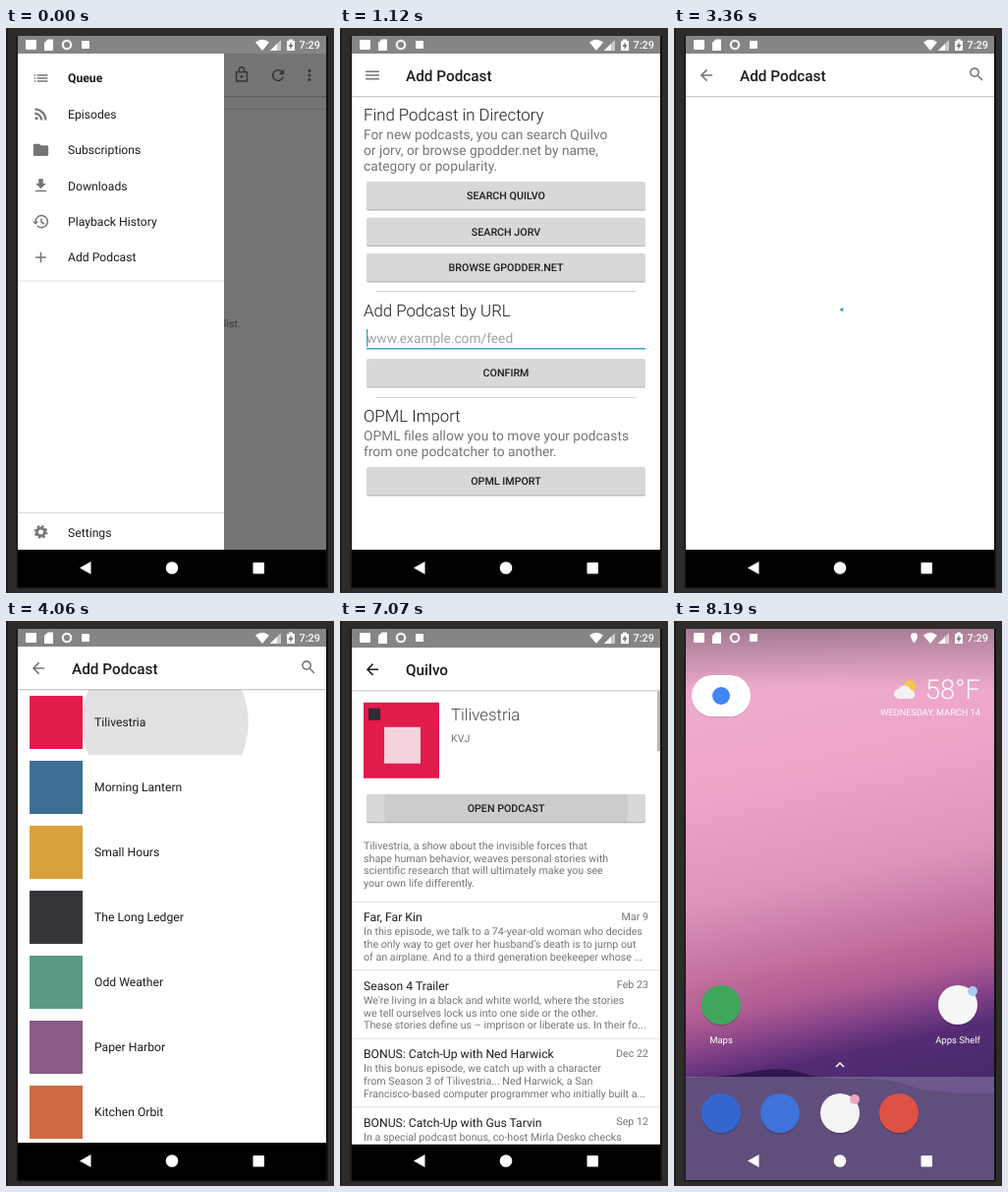
An HTML page for the animation above (8.26 s loop, 334 by 574 pixels).

```html
<!DOCTYPE html>
<html lang="en">
<head>
<meta charset="utf-8">
<title>Adding a podcast</title>
<style>
html, body { margin: 0; width: 100%; height: 100%; overflow: hidden; background: #2b2a28; }
svg { display: block; }
text { font-family: Roboto, "Noto Sans", sans-serif; text-rendering: geometricPrecision; white-space: pre; }
</style>
</head>
<body>
<svg id="stage" width="334" height="574" viewBox="0 0 334 574"></svg>
<script>
const LOOP = 8260, STEP = 70;
const GRAY = '#757575', INK = '#1c1c1c', TEAL = '#35a4c6', RED = '#e21b4d';
const SHOW = 'Tilivestria', MAKER = 'KVJ', STORE = 'Quilvo';

const rect = (x, y, w, h, fill, extra = '') =>
  `<rect x="${x}" y="${y}" width="${w}" height="${h}" fill="${fill}" ${extra}/>`;
const circle = (x, y, r, fill, extra = '') =>
  `<circle cx="${x}" cy="${y}" r="${r}" fill="${fill}" ${extra}/>`;
const text = (x, y, str, size, fill = INK, weight = 400, anchor = 'start', extra = '') =>
  `<text x="${x}" y="${y}" font-size="${size}" fill="${fill}" font-weight="${weight}" text-anchor="${anchor}" ${extra}>${str}</text>`;
const lines = (x, y, pitch, rows, size, fill) =>
  rows.map((row, i) => text(x, y + i * pitch, row, size, fill)).join('');
const group = (id, body) => `<g id="${id}">${body}</g>`;
const clip = (x, y, w, h, body) =>
  `<svg x="${x}" y="${y}" width="${w}" height="${h}" viewBox="0 0 ${w} ${h}">${body}</svg>`;
const hidden = id => `id="${id}" opacity="0"`;
const stroke = (d, w = 2) => `<path d="${d}" fill="none" stroke="currentColor" stroke-width="${w}"/>`;
const solid = d => `<path d="${d}" fill="currentColor"/>`;
const gear = (x, y, r) =>
  circle(x, y, r, 'none', `stroke="currentColor" stroke-width="${r * .72}"`) +
  circle(x, y, r * 1.5, 'none', `stroke="currentColor" stroke-width="${r * .5}" stroke-dasharray="${r * .64} ${r * .538}"`);

// Glyphs on a 24-unit grid
const GLYPHS = {
  menu: stroke('M3 7H21M3 12H21M3 17H21'),
  back: stroke('M20 12H5M12.7 4.7 5.4 12l7.3 7.3'),
  search: stroke('M9.5 4a5.5 5.5 0 1 0 .01 0M14 14l5.8 5.8'),
  refresh: stroke('M18.8 14a7 7 0 1 1-1.6-6.7') + solid('M20 4v7h-7z'),
  more: [6, 12, 18].map(y => circle(12, y, 2, 'currentColor')).join(''),
  list: stroke('M3 8h2m2 0h14M3 12h2m2 0h14M3 16h2m2 0h14'),
  rss: stroke('M4 5.6A14.4 14.4 0 0 1 18.4 20M4 11.3A8.7 8.7 0 0 1 12.7 20', 2.8) + circle(6.2, 17.8, 2.2, 'currentColor'),
  folder: solid('M4 4h6l2 2h8q2 0 2 2v10q0 2-2 2H4q-2 0-2-2V6q0-2 2-2z'),
  download: solid('M19 9h-4V3H9v6H5l7 7zM5 18v2h14v-2z'),
  history: stroke('M5 12a8 8 0 1 1 2.4 5.7M12.7 8v5l4 2.3') + solid('M1 12h8l-4 4z'),
  add: stroke('M12 5v14M5 12h14'),
  settings: gear(12, 12, 5.1),
  gears: gear(8, 12, 4.1) + gear(18.5, 6.5, 2.4) + gear(18.5, 17.5, 2.4),
  filter: stroke('M3 7h18M6 12h12M10 17h4'),
  lock: stroke('M5 9h14v12H5zM8.5 9V6a3.5 3.5 0 0 1 7 0v3') + circle(12, 15, 2, 'currentColor'),
  hearing: stroke('M7 3a9 9 0 0 0 0 13M4 1a13 13 0 0 0 0 17M10 9a4.5 4.5 0 0 1 9 0c0 4-4 4.5-5 8s-4 4-5.5 2.5', 1.9) + circle(14.5, 9, 2, 'currentColor'),
  info: circle(12, 12, 10, 'currentColor') + '<path d="M12 7v2M12 11v6" stroke="#8c1733" stroke-width="2"/>'
};
const icon = (name, x, y, color = GRAY, size = 18.4) =>
  `<g color="${color}" transform="translate(${x - size / 2} ${y - size / 2}) scale(${size / 24})">${GLYPHS[name]}</g>`;

const toolbar = (left, title, leftColor = GRAY) =>
  rect(12, 69, 314, 1, '#c9c9c9') + rect(12, 70, 314, 1, '#ececec') +
  icon(left, 33, 48, leftColor) + text(67, 53.7, title, 15.3, INK, 500);
const page = rect(12, 8, 314, 18, '#858585') + rect(12, 26, 314, 542, '#fff');
const button = (y, label, id = '') =>
  rect(27, y + 1, 284, 28.5, '#b5b5b5', `rx="2" id="${id}Shadow"`) +
  clip(27, y, 284, 28.5, rect(0, 0, 284, 28.5, '#d8d8d8', 'rx="2"') + (id && circle(142, 14, 0, '#000', hidden(id + 'Ripple')))) +
  text(169, y + 18, label, 10.7, INK, 500, 'middle', id && `id="${id}Label"`);
const spinner = id => circle(169.5, 300, 14, 'none',
  `id="${id}" stroke="${TEAL}" stroke-width="3" pathLength="100"`);
const cover = y => rect(24, y, 77, 77, RED) + rect(45, y + 25, 37, 37, '#f4d3dc') + rect(29, y + 6, 12, 12, '#2c2c34');

const DRAWER = [['list', 'Queue'], ['rss', 'Episodes'], ['folder', 'Subscriptions'],
  ['download', 'Downloads'], ['history', 'Playback History'], ['add', 'Add Podcast']];
const EPISODES = [
  ['Far, Far Kin', 'Mar 9', 'In this episode, we talk to a 74-year-old woman who decides',
    'the only way to get over her husband’s death is to jump out', 'of an airplane. And to a third generation beekeeper whose ...'],
  ['Season 4 Trailer', 'Feb 23', "We're living in a black and white world, where the stories",
    'we tell ourselves lock us into one side or the other.', 'These stories define us – imprison or liberate us. In their fo...'],
  ['BONUS: Catch-Up with Ned Harwick', 'Dec 22', 'In this bonus episode, we catch up with a character',
    `from Season 3 of ${SHOW}... Ned Harwick, a San`, 'Francisco-based computer programmer who initially built a...'],
  ['BONUS: Catch-Up with Gus Tarvin', 'Sep 12', 'In a special podcast bonus, co-host Mirla Desko checks'],
  ['Season 3 Extra', 'Sep 5']
];

const queuePage = page + toolbar('menu', 'Queue') + icon('lock', 240, 47) + icon('refresh', 277, 48) +
  icon('more', 309, 48) + rect(12, 82, 314, 1, '#ddd') +
  text(169, 304, 'There are no items in this list.', 10.7, GRAY, 400, 'middle');

const addPage = page + toolbar('menu', 'Add Podcast') +
  text(24, 93.5, 'Find Podcast in Directory', 16.8, INK, 300) +
  lines(24, 112.5, 16, [`For new podcasts, you can search ${STORE}`, 'or jorv, or browse gpodder.net by name,', 'category or popularity.'], 13.75, GRAY) +
  button(156, `SEARCH ${STORE.toUpperCase()}`, 'search') + button(192.5, 'SEARCH JORV') + button(229, 'BROWSE GPODDER.NET') +
  rect(37, 267, 264, 1, '#d2d2d2') + text(24, 293, 'Add Podcast by URL', 16.8, INK, 300) +
  text(27, 319.5, 'www.example.com/feed', 13.75, '#a2a2a2') + rect(27, 306, 1.3, 18, TEAL) + rect(27, 325, 284, 1.5, TEAL) +
  button(336, 'CONFIRM') + rect(37, 375, 264, 1, '#d2d2d2') + text(24, 399.5, 'OPML Import', 16.8, INK, 300) +
  lines(24, 419, 16, ['OPML files allow you to move your podcasts', 'from one podcatcher to another.'], 13.75, GRAY) +
  button(446, 'OPML IMPORT');

const RESULTS = [[SHOW, RED], ['Morning Lantern', '#3d6f92'], ['Small Hours', '#d8a13c'], ['The Long Ledger', '#35353c'],
  ['Odd Weather', '#5a9a86'], ['Paper Harbor', '#8b5a86'], ['Kitchen Orbit', '#cf6a44']];
const resultRows = clip(12, 70, 314, 66, circle(150, 33, 0, '#000', hidden('resultRipple'))) +
  RESULTS.map(([name, color], i) => rect(24, 76 + i * 66, 54, 54, color) + text(90, 107 + i * 66, name, 12.2)).join('');
const searchPage = page + toolbar('back', 'Add Podcast') + icon('search', 308, 47) +
  spinner('searchSpin') + group('results', resultRows);

const detailRows = EPISODES.slice(0, 4).map(([title, date, ...body], i) => {
  const y = 283.5 + i * 69.5;
  return rect(12, y, 314, 1, '#dedede') + text(24, y + 20.5, title, 12.2) +
    text(314, y + 19, date, 10.7, GRAY, 400, 'end') + lines(24, y + 34.5, 12.8, body, 10.7, GRAY);
}).join('');
const detailBody = cover(81.5) + text(113, 99.5, SHOW, 16.8, '#444', 300) + text(113, 122, MAKER, 10.7, GRAY) +
  button(174.5, 'SUBSCRIBE', 'subscribe') +
  lines(24, 230.5, 12.8, [`${SHOW}, a show about the invisible forces that`, 'shape human behavior, weaves personal stories with',
    'scientific research that will ultimately make you see', 'your own life differently.'], 10.7, GRAY) +
  detailRows + rect(323, 70, 3, 61, '#b9b9b9');
const detailPage = clip(0, 0, 334, 530.5,
  page + toolbar('back', STORE, INK) + spinner('detailSpin') + group('detailBody', detailBody));

const loadingDots = (x, y) => circle(x, y, 4.3, 'none', 'stroke="#666" stroke-width="2" stroke-dasharray="1.7 1.677"');
const feedRows = EPISODES.map(([title, date], i) => {
  const y = 170 + i * 75;
  return text(24, y + 27, title, 12.2) + loadingDots(29, y + 53) + text(240, y + 59, date, 10.7, GRAY, 400, 'end') +
    icon('hearing', 253, y + 55, '#666', 16) + rect(288.5, y + 13, 1, 50, '#d5d5d5') +
    icon('download', 308, y + 38) + rect(12, y + 75, 314, 1, '#e0e0e0');
}).join('');
const softBars = [...Array(6)].map((_, i) =>
  rect(98 + i * 38, i % 2 ? 30 : 4, 16, 66, '#988087', `transform="rotate(${i % 3 * 14 - 14} ${106 + i * 38} 50)"`)).join('');
const feedPage = page + icon('menu', 33, 48) + icon('search', 166, 48) +
  icon('filter', 203, 48) + icon('gears', 240, 48, '#666', 20) + icon('refresh', 277, 48) + icon('more', 309, 48) +
  clip(12, 69.5, 314, 101, rect(0, 0, 314, 101, '#86122d') + `<g filter="url(#blur)">${softBars}</g>`) +
  cover(81) + text(113, 99.5, SHOW, 16.8, '#fff', 300) + text(113, 128, MAKER, 10.7, '#fff') +
  icon('info', 308, 94, '#fff', 19) + feedRows + text(282, 193.5, 'NEW', 9, '#8aa822', 400, 'end');

const drawer = rect(12, 26, 210, 504, '#fff') +
  DRAWER.map(([glyph, label], i) => {
    const y = 51 + i * 36.4;
    return icon(glyph, 35.5, y) + text(63, y + 4.3, label, 12.2, INK, 400, 'start', 'class="entry"');
  }).join('') +
  clip(12, 215, 210, 37, circle(105, 18, 0, '#000', hidden('drawerRipple'))) +
  rect(12, 256.5, 210, 1, '#dcdcdc') + rect(12, 492, 210, 1, '#dcdcdc') +
  icon('settings', 35.5, 512) + text(63, 516.5, 'Settings', 12.2);

const launcher = (x, y, color) => circle(x, y + 1.5, 20, '#000', 'opacity=".18"') + circle(x, y, 20, color);
const home = rect(12, 8, 314, 560, 'url(#sky)') + rect(12, 8, 314, 60, 'url(#topShade)') +
  '<path d="M12 464Q50 464 80 458T130 459T185 465T240 472T327 480V569H12z" fill="#2e184c"/>' +
  rect(12, 463, 314, 105, '#9d90b8', 'opacity=".45"') +
  rect(18, 56, 60, 42, '#000', 'rx="21" opacity=".12"') + rect(18, 55, 60, 42, '#fff', 'rx="21"') + circle(48, 76, 9, '#4285f4') +
  circle(240, 66, 6, '#f7c748') +
  '<path d="M229 79a5 5 0 0 1 0-10a6.5 6.5 0 0 1 12 1a4.6 4.6 0 0 1 1 9z" fill="#f2f1f4"/>' +
  text(312, 79, '58°F', 27.5, '#fff', 300, 'end') + text(312, 96, 'WEDNESDAY, MARCH 14', 9.2, '#fff', 400, 'end') +
  launcher(48, 390, '#3fa65b') + launcher(289, 390, '#f7f7f7') + circle(304, 376, 5, '#a9cdf3') +
  text(48, 429, 'Maps', 9.5, '#fff', 400, 'middle') + text(289, 429, 'Apps Shelf', 9.5, '#fff', 400, 'middle') +
  '<path d="M165 453l4-4 4 4" fill="none" stroke="#fff" stroke-width="1.5"/>' +
  launcher(48, 500, '#3566cf') + launcher(108, 500, '#3f72da') + launcher(169, 500, '#f5f3f4') +
  circle(184, 486, 5, '#eda9c2') + launcher(229, 500, '#dd5144');

const statusIcons = `<g fill="#fff">
  ${rect(20, 12, 11, 10, '#fff', 'rx="1"')}
  <path d="M42.5 11.5H48V23h-9v-8z"/>
  ${circle(62, 17, 4.2, 'none', 'stroke="#fff" stroke-width="2.2" opacity=".9"')}
  ${rect(77, 13, 8, 8, '#fff')}
  <path d="M254 14.5q7-5.5 14 0L261 23z"/>
  <path d="M280 12v11h-11z" opacity=".55"/><path d="M276 16v7h-7z"/>
  <path d="M286 13h2v-1.5h4V13h2v10h-8z"/><path d="M290.5 14l-3 5h2v3l3-5h-2z" fill="#777"/>
  <path id="pin" d="M244.5 12a3.5 3.5 0 0 1 3.5 3.5c0 2.5-3.5 7-3.5 7s-3.5-4.5-3.5-7a3.5 3.5 0 0 1 3.5-3.5z"/>
  </g>` + text(320, 21, '7:29', 10.9, '#fff', 500, 'end');
const navIcons = '<path d="M86.5 542v13L75 548.5z" fill="#fff"/>' + circle(169, 548.5, 6.3, '#fff') +
  rect(251.5, 543, 11.5, 11.5, '#fff', 'rx="1"');
const bezel = '<path fill-rule="evenodd" fill="#2d2c2a" d="M0 0H334V574H0zM12 8V568H326V8z"/>' +
  rect(0, 0, 2, 574, '#1d1c1b') + rect(10.5, 8, 1.5, 561, '#1a1918') + rect(326, 8, 2, 561, '#111') + rect(12, 568, 314, 1.5, '#151515');

const stops = pairs => pairs.map(([at, c, o = 1]) => `<stop offset="${at}" stop-color="${c}" stop-opacity="${o}"/>`).join('');
const stage = document.getElementById('stage');
stage.innerHTML = `<defs>
  <linearGradient id="sky" x2=".12" y2="1">${stops([[0, '#dda3c0'], [.14, '#eeabca'], [.32, '#eda3c7'], [.5, '#dc94bb'],
    [.62, '#c5739f'], [.71, '#ae5a92'], [.77, '#803f86'], [.82, '#552c74'], [1, '#3a2862']])}</linearGradient>
  <linearGradient id="topShade" x2="0" y2="1">${stops([[0, '#5c4a58', .45], [1, '#5c4a58', 0]])}</linearGradient>
  <filter id="blur"><feGaussianBlur stdDeviation="3"/></filter></defs>` +
  home +
  group('app', group('queue', queuePage) + group('add', addPage) + group('search', searchPage) + group('feed', feedPage) +
    rect(12, 26, 314, 504, '#000', 'id="scrim"') + group('drawer', drawer)) +
  rect(12, 530, 314, 38, '#000', 'id="navBar"') + group('detail', detailPage) +
  circle(169, 548.5, 0, '#fff', hidden('homeRipple')) + statusIcons + navIcons + bezel;

const el = id => document.getElementById(id);
const set = (id, name, value) => el(id).setAttribute(name, value);
const show = (id, on) => set(id, 'display', on ? 'inline' : 'none');
const span = (t, a, b) => Math.min(1, Math.max(0, (t - a) / (b - a)));
const ease = p => p * p * (3 - 2 * p);
const easeOut = (p, power) => 1 - (1 - p) ** power;

function ripple(id, t, start, end, reach = 145) {
  const p = span(t, start, end);
  set(id, 'r', reach * (.1 + .9 * easeOut(p, 2)));
  set(id, 'opacity', t < start ? 0 : .14 * (1 - p));
}

function spin(id, t, start) {
  const age = Math.max(0, t - start), u = age % 1333 / 1333;
  const tail = 75 * ease(span(u, .5, 1)), head = 75 * ease(span(u, 0, .5)) + 3;
  const turns = Math.floor(age / 1333) * .75;
  set(id, 'stroke-dasharray', `${head - tail} 100`);
  set(id, 'stroke-dashoffset', -tail);
  set(id, 'transform', `rotate(${-95 + 360 * turns + age * .162} 169.5 300)`);
}

// Opening rises into place while fading in; closing sinks while fading out.
function moveDetail(t) {
  const closing = span(t, 7042, 7210);
  const y = 45 * (1 - easeOut(span(t, 4100, 4410), 5)) + 45 * closing ** 2;
  set('detail', 'transform', `translate(0 ${y})`);
  set('detail', 'opacity', easeOut(span(t, 4100, 4300), 4) * (1 - span(closing, .4, 1)));
  show('detail', t >= 4100 && closing < 1);
}

function render(t) {
  show('queue', t < 630);
  show('add', t >= 630 && t < 3290);
  show('search', t >= 3290 && t < 4410);
  show('feed', t >= 7000);

  const closed = easeOut(span(t, 600, 1112), 5);
  set('drawer', 'transform', `translate(${-212 * closed} 0)`);
  show('drawer', closed < 1);
  set('scrim', 'opacity', .54 * (1 - closed));
  const chosen = t < 630 ? 0 : 5;
  document.querySelectorAll('.entry').forEach((entry, i) => entry.setAttribute('font-weight', i === chosen ? 700 : 400));
  ripple('drawerRipple', t, 490, 840);

  ripple('searchRipple', t, 2660, 3290);
  show('results', t >= 3780);
  show('searchSpin', t < 3780);
  spin('searchSpin', t, 3330);
  ripple('resultRipple', t, 3990, 4340, 200);

  moveDetail(t);
  show('detailBody', t >= 4480);
  show('detailSpin', t < 4480);
  spin('detailSpin', t, 4130);
  const busy = t >= 5320 && t < 6300;
  el('subscribeLabel').textContent = t < 5320 ? 'SUBSCRIBE' : busy ? 'DOWNLOADING...' : 'OPEN PODCAST';
  set('subscribeLabel', 'fill', busy ? '#909090' : INK);
  show('subscribeShadow', !busy);
  if (t < 6300) ripple('subscribeRipple', t, 5180, 5600);
  else ripple('subscribeRipple', t, 6860, 7210);

  const leaving = span(t, 7630, 7933);
  set('app', 'transform', `translate(0 ${564 * leaving ** 2})`);
  show('app', leaving < 1);
  show('navBar', leaving === 0);
  ripple('homeRipple', t, 7350, 7700, 26);
  show('pin', t >= 8050);
}

let origin;
function tick(now) {
  origin ??= now;
  render(Math.floor((now - origin) % LOOP / STEP) * STEP);
  requestAnimationFrame(tick);
}
render(0);
requestAnimationFrame(tick);
</script>
</body>
</html>
```
